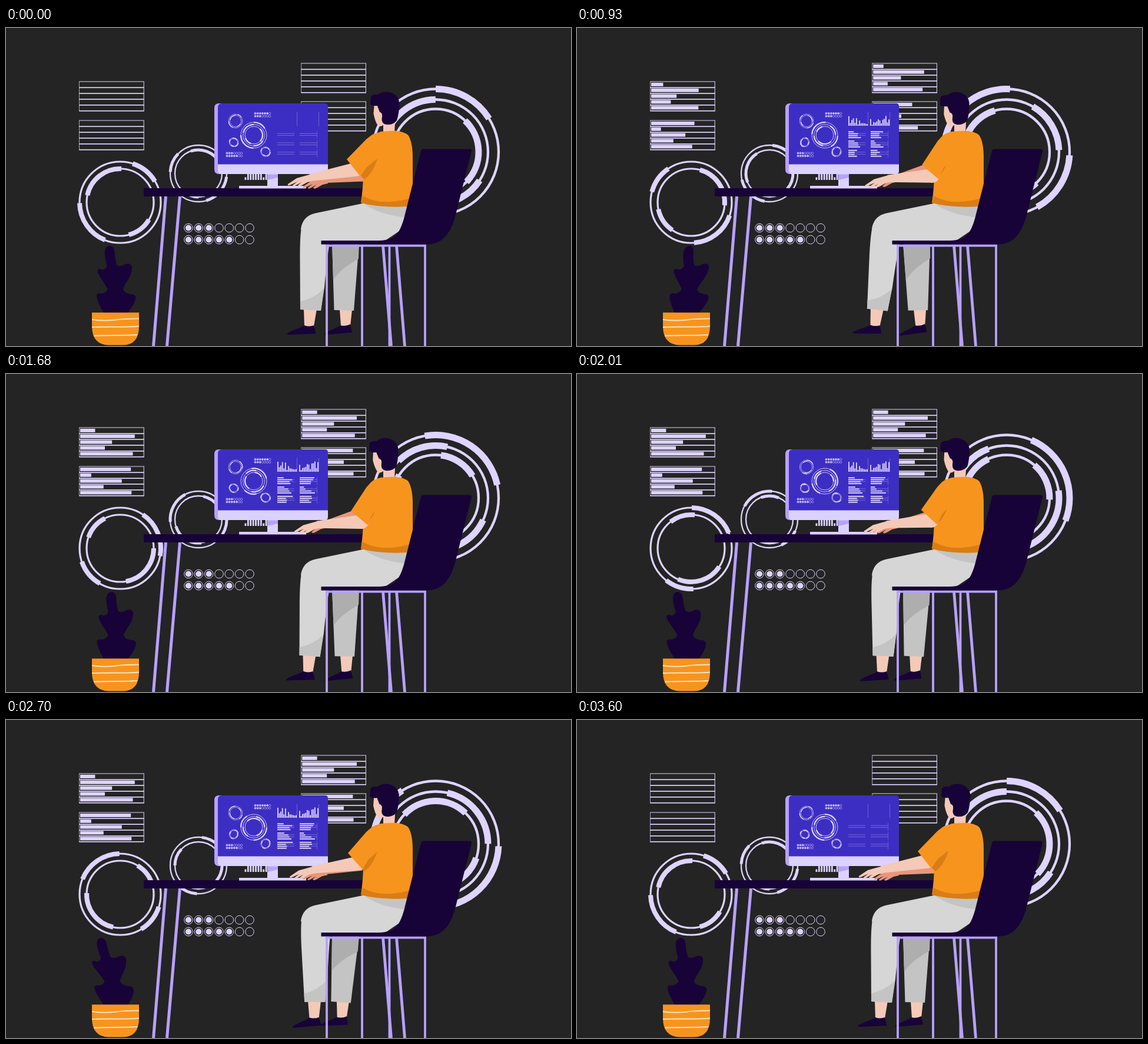
Animation of 960x540 px, one loop 3630 ms. Source, as an HTML page with a canvas:

```html
<!DOCTYPE html>
<html lang="en">
<head>
<meta charset="utf-8">
<title>At the desk</title>
<style>
html, body { margin: 0; width: 100%; height: 100%; overflow: hidden; background: #242424; }
canvas { display: block; }
</style>
</head>
<body>
<canvas id="stage" width="960" height="540"></canvas>
<script>
const ctx = document.getElementById('stage').getContext('2d');
const LOOP = 3630, TURN = 3600, DEG = Math.PI / 180;
const PALE = '#ded4ff', LILAC = '#b8a1ff', INK = '#170338', BLUE = '#3d2ec3', FAINT = '#8176dc';
const ORANGE = '#f7941e', RUST = '#d97d14', SKIN = '#f4c9b8', BLUSH = '#e9967c';
const CLOTH = '#d6d6d6', SHADE = '#c4c4c4', DEEP = '#aeaeae';

const fill = (d, color) => { ctx.fillStyle = color; ctx.fill(new Path2D(d)); };
const line = (d, color, width) => {
  ctx.strokeStyle = color;
  ctx.lineWidth = width;
  ctx.stroke(new Path2D(d));
};
const rect = (x, y, w, h, color) => { ctx.fillStyle = color; ctx.fillRect(x, y, w, h); };
const disc = (x, y, r, color) => {
  ctx.fillStyle = color;
  ctx.beginPath();
  ctx.arc(x, y, r, 0, 7);
  ctx.fill();
};
const mix = (a, b, k) => a + (b - a) * k;
const clamp = x => Math.max(0, Math.min(1, x));
const ease = x => (1 - Math.cos(Math.PI * clamp(x))) / 2;
const noise = seed => { const n = Math.abs(Math.sin(seed * 12.9898) * 43758.5453); return n - Math.floor(n); };

function pivot(x, y, angle, draw) {
  ctx.save();
  ctx.translate(x, y);
  ctx.rotate(angle);
  ctx.translate(-x, -y);
  draw();
  ctx.restore();
}

// A thin circle carrying two thick arcs, turning once per loop
function ring(r, dir, start, first, offset, second) {
  return (x, y, scale, thin, thick, t) => {
    const arc = (from, length, width) => {
      ctx.lineWidth = width;
      ctx.beginPath();
      ctx.arc(x, y, r * scale, from * DEG, (from + length) * DEG);
      ctx.stroke();
    };
    const angle = start + dir * 360 * t / TURN;
    ctx.strokeStyle = PALE;
    arc(0, 360, Math.max(.7, thin * scale));
    arc(angle, first, Math.max(1.5, thick * scale));
    arc(angle + offset, second, Math.max(1.5, thick * scale));
  };
}
const pair = (r, gap, dir, outer, inner) =>
  [ring(r, dir, outer, 41, 184, 67), ring(r - gap, -dir, inner, 80, 199, 44)];

const WIDE = [ring(107, 1, -90, 58, 182, 88), ring(89, -1, 33, 58, 160, 77), ring(73, 1, -47, 91, 156, 52)];
const MEDIUM = pair(69, 12, -1, -72, -168);
const SMALL = pair(48, 8, 1, 183, -109);

const wideDial = (x, y, t, scale = 1) => WIDE.forEach(draw => draw(x, y, scale, 4.3, 11, t));
const mediumDial = (x, y, t, scale = 1) => MEDIUM.forEach(draw => draw(x, y, scale, 3.2, 8, t));
const smallDial = (x, y, t, scale = 1) => SMALL.forEach(draw => draw(x, y, scale, 2.3, 5, t));

// Two rows of seven dots, the first few of each filled
function dots(x, y, scale, counts) {
  counts.forEach((count, row) => {
    for (let i = 0; i < 7; i++) {
      const cx = x + 17.33 * scale * i, cy = y + 20 * scale * row;
      ctx.beginPath();
      ctx.arc(cx, cy, 7.3 * scale, 0, 7);
      ctx.strokeStyle = PALE;
      ctx.lineWidth = Math.max(.5, scale);
      ctx.stroke();
      if (i < count) disc(cx, cy, 5.1 * scale, PALE);
    }
  });
}

// Bars start at scattered moments, then all fade before the loop ends
const grow = (t, seed) => ease((t - 60 - 330 * noise(seed)) / 1000);
function bars(t, draw) {
  ctx.globalAlpha = clamp((3570 - t) / 530);
  draw();
  ctx.globalAlpha = 1;
}

function panel(x, y, t, shares) {
  const w = 110.5, step = 9.88;
  for (let i = 0; i < 6; i++) rect(x, y + step * i - .5, w, i ? 1.7 : 1, PALE);
  rect(x, y, .7, 50, PALE);
  rect(x + w - 1, y, 1, 50, PALE);
  bars(t, () => shares.forEach((share, i) =>
    rect(x + 1.8, y + 1.9 + step * i, share * w * grow(t, x + y + i), 6, PALE)));
}

function background(t) {
  const upper = [.23, .84, .49, .38, .81], lower = [.78, .17, .64, .36, .79];
  rect(0, 0, 960, 540, '#242424');
  wideDial(730, 210.5, t);
  mediumDial(194, 296, t);
  smallDial(327, 247, t);
  panel(124.2, 91, t, upper);
  panel(124.2, 157, t, lower);
  panel(501.4, 60, t, upper);
  panel(501.4, 125, t, lower);
  dots(310, 339.5, 1, [3, 5]);
  for (let i = 0; i < 9; i++) {
    const h = i % 7 ? 10 : 4.5;
    rect(405.5 + 4.4 * i, 258 - h, 2.8, h, PALE);
  }
}

function miniChart(x, t) {
  rect(x + 33, 143, .7, 23, FAINT);
  bars(t, () => {
    for (let i = 0; i < 13; i++) {
      const h = (3 + 15 * noise(x + i) ** 1.5) * grow(t, i);
      rect(x + 2.6 * i, 166 - h, 1.8, h, PALE);
    }
  });
}

function miniTable(x, y, t) {
  for (const dy of [3.8, 7.2]) rect(x, y + dy, 29, .8, FAINT);
  if (x > 490) rect(x + 29, y, .6, 13, FAINT);
  bars(t, () => {
    for (let i = 0; i < 4; i++) {
      const w = 6 + 21 * noise(x + y + i);
      rect(x, y + .3 + 3.3 * i, w * grow(t, y + i), 1.9, PALE);
    }
  });
}

function monitor(t) {
  fill('M362 128H380V248H362Q354 248 354 240V136Q354 128 362 128Z', LILAC);
  fill('M367 128H542Q547 128 547 133V232H360V135Q360 128 367 128Z', BLUE);
  fill('M360 231.5H547V243Q547 248 542 248H366Q360 248 360 242Z', '#dcd2ff');
  rect(444, 248, 18, 22, '#dcd2ff');
  fill('M444 248.5H462V254L444 258Z', LILAC);
  rect(396, 268, 114, 4.5, '#dcd2ff');
  wideDial(421, 182, t, .205);
  mediumDial(390, 158, t, .17);
  smallDial(387, 194, t, .16);
  smallDial(441, 210, t, .17);
  dots(423.5, 145, .237, [6, 3]);
  dots(375.5, 212.5, .237, [3, 5]);
  for (const x of [461, 499]) {
    miniChart(x - (x > 490), t);
    for (let row = 0; row < 3; row++) miniTable(x, 175 + 15.8 * row, t);
  }
}

function plant(swing) {
  const lean = (14.5 * swing - .5) / 111;
  ctx.save();
  ctx.transform(1, 0, -lean, 1, 483 * lean, 0);
  fill('M166 484C161 474 154 463 154 454Q155 449 162 451Q169 450 173 444C168 433 159 424 155.500 413Q156 407 163 410' +
    'Q169 411 172 404C169 393 167 382 169 376Q172 369 178 370Q184 371 185 380Q186 395 189 403Q196 406 203 401' +
    'Q213 398 214.500 406C214 424 203 431 199 444Q203 452 215 452Q222 454 220 461C216 473 211 478 207 484Z', INK);
  ctx.restore();
  fill('M146 483.300H226V506Q226 538 199 538.500H175Q146 538 146 506Z', ORANGE);
  line('M146 495C160 497.500 172 497.500 187 495.500S212 493.500 226 493.500M146 508C175 506.500 200 508.500 226 506.500' +
    'M149 522.500C175 521.500 200 522.500 223 521', '#ffe2bd', 2);
}

function desk() {
  rect(234, 272, 385, 14, INK);
  line('M271.500 286L250.500 540M295.500 286L273.500 540', LILAC, 5);
}

function legs(swing) {
  pivot(575, 365, -.045 * swing, () => {
    fill('M567 478H588L585 506H569Z', SKIN);
    fill('M540 520C548 513 558 512 568 505Q577 507 585 503L588 517L543 521Z', INK);
    fill('M554 364H600L591 480L557.500 479Z', SHADE);
    fill('M554 364H600L599 392C580 403 567 412 556 427Z', DEEP);
  });
  pivot(520, 335, .05 * swing, () => {
    fill('M506 477H528L523 507H507Z', SKIN);
    fill('M477 519.500C486 512 496 512 507 505Q515 508 523 505L526.500 519L480 521Z', INK);
    fill('M503 334Q499 350 499.500 395L500 478L535 480L541 440C543 420 545 395 549 369L552 335Z', CLOTH);
    fill('M500 464Q522 460 540 443L535 480L500 478Z', SHADE);
  });
  fill('M608 297.500L528 314C511 317 503 327 501 342L545 364H640L690 330V303Z', CLOTH);
  fill('M608 298C625 311 650 319 682 322L690 302Z', SHADE);
}

// Tapered forearm ending in a hand
function forearm(ex, ey, er, wx, wy, wr, color) {
  const angle = Math.atan2(ey - wy, ex - wx), length = Math.hypot(ex - wx, ey - wy);
  disc(ex, ey, er, color);
  ctx.save();
  ctx.translate(wx, wy);
  fill('M2 -6L-23 1L-38 11Q-39 14 -35 13L-22 7L-30 13Q-30 16 -26 14L-15 8L-21 13Q-20 16 -16 14L-5 8L4 6Z', color);
  ctx.rotate(angle);
  fill(`M0 ${-wr}L${length} ${-er}V${er}L0 ${wr}Z`, color);
  ctx.restore();
}

function person(swing, reach) {
  legs(swing);
  forearm(mix(606, 595, reach), mix(253, 236, reach), 7.5, mix(543, 540, reach), mix(258, 255, reach), 5, BLUSH);
  fill('M641 160H661L660 178H641Z', SKIN);
  fill('M636 176Q650 174.500 662 174.500Q680 177 684 183Q691 195 691 220V266L683 302Q640 306 603 297Q607 270 607 245L612 194Z', ORANGE);
  fill('M606 285Q640 304 690 288L683 303Q640 306 603 297Z', RUST);
  fill('M631 222L612 234L602 250L609 257Q624 246 631 222Z', RUST);
  forearm(mix(595, 605, reach), mix(240, 252, reach), 12, mix(517, 529, reach), mix(254, 256, reach), 6, SKIN);
  pivot(632, 190, -.21 * reach, () =>
    fill('M640 177Q628 177 621 182L612 189L579 223L602 252L613 236L632 221Z', ORANGE));
  pivot(651, 172, -.05 * reach, () => {
    fill('M626 128L624.500 145Q627 160 633 167Q640 168 645 160L642 130Z', SKIN);
    fill('M619 130L620 116Q625 112 632 113Q642 106 655 110Q667 115 668.500 127Q668 145 664 157Q658 165 647 164' +
      'Q639 163 638.500 156L639 147L635 143L631 132Q625 133 619 130Z', INK);
    fill('M632 149Q632 143 636 143Q640 145 639 151Q637 157 634 156Q632 154 632 149Z', SKIN);
  });
}

function chair() {
  line('M543 369.500H714M545 369V540M605 369V540M651.500 369V540M712 369V540', LILAC, 3.8);
  line('M640.500 369L654.500 540M663.500 369L677.500 540', LILAC, 4.8);
  fill('M709 205.500H789Q792 206 791 209L764 317C757 345 744 367 716 367.500H535.500V361H634' +
    'C660 360 668 351 676 324L705 209Q706 205.500 709 205.500Z', INK);
}

function frame() {
  const t = performance.now() % LOOP % TURN, u = t / TURN;
  const swing = Math.sin(2 * Math.PI * u);
  const reach = Math.sin(Math.PI * u ** .68) ** 2;
  background(t);
  desk();
  monitor(t);
  plant(swing);
  person(swing, reach);
  chair();
  requestAnimationFrame(frame);
}
frame();
</script>
</body>
</html>
```
